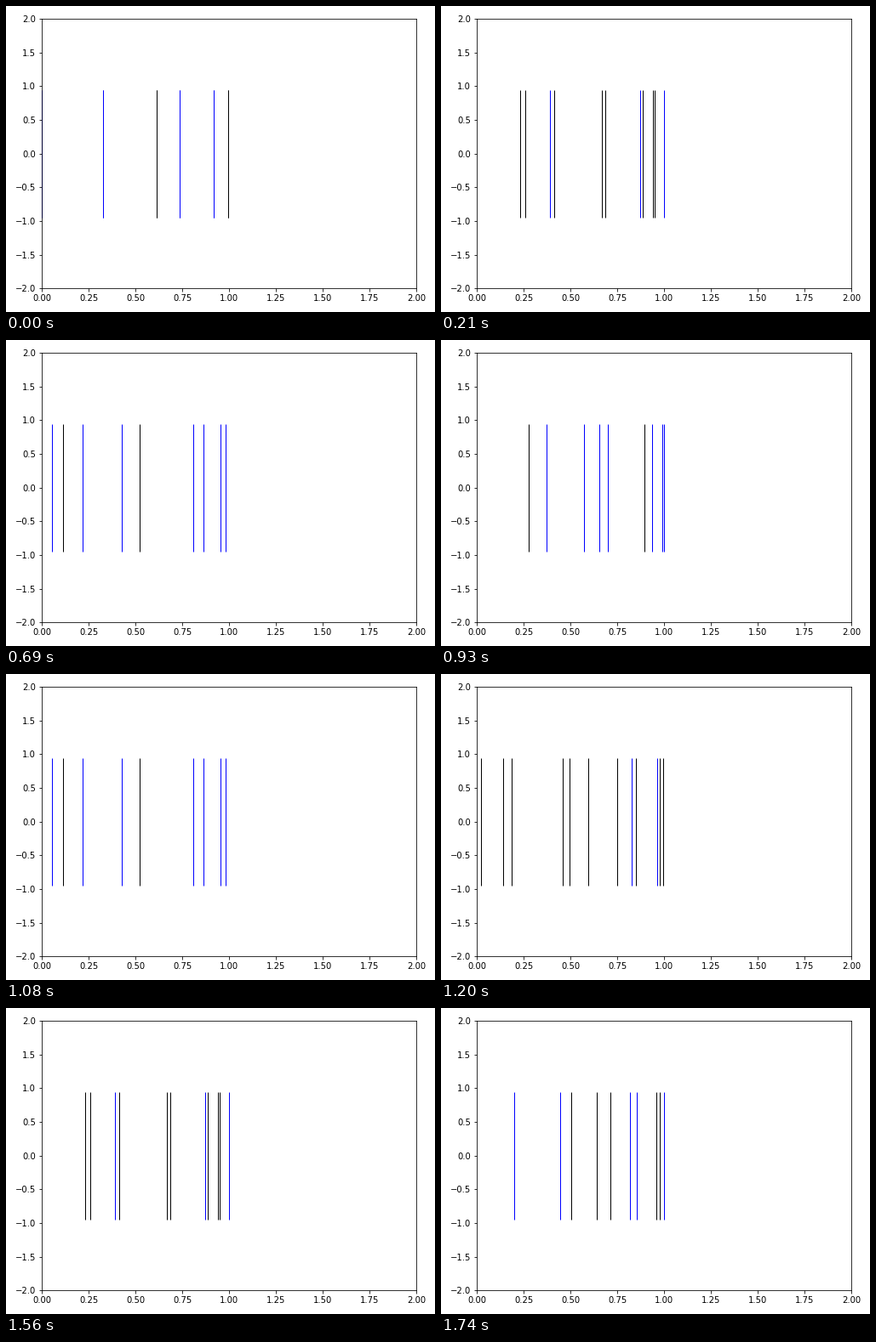
A matplotlib script for the animation above (1770 ms loop, 504x360 px).

```python
import numpy as np
import matplotlib.pyplot as plt
from matplotlib.animation import FuncAnimation

W, H, DPI = 504, 360, 72
FRAMES, INTERVAL = 59, 30
TURNS = 9  # whole turns of the wave per loop

plt.rcParams.update({"font.family": "DejaVu Sans", "font.size": 10})

fig = plt.figure(figsize=(W / DPI, H / DPI), dpi=DPI, facecolor="white")
ax = fig.add_axes([42.16 / W, 27.8 / H, 440 / W, 317 / H],
                  xlim=(0, 2), ylim=(-2, 2))

phase = np.linspace(0, 5 * np.pi, 20)


def bars(color):
    return ax.plot([], [], "|", color=color, markersize=150,
                   markeredgewidth=1)[0]


blue, black = bars("blue"), bars("black")


def update(i):
    x = np.sin(phase - 2 * np.pi * TURNS * i / FRAMES)
    # bars on even pixel columns are blue, on odd ones black
    left = ax.bbox.x0
    col = np.floor(left + x * ax.bbox.width / 2 + 0.5).astype(int)
    for line, parity in ((blue, 0), (black, 1)):
        xs = x[(col % 2 == parity) & (x > -1e-6)]
        line.set_data(xs, np.zeros_like(xs))
    return blue, black


anim = FuncAnimation(fig, update, frames=FRAMES, interval=INTERVAL,
                     repeat=True, repeat_delay=0, blit=False)
plt.show()
```
